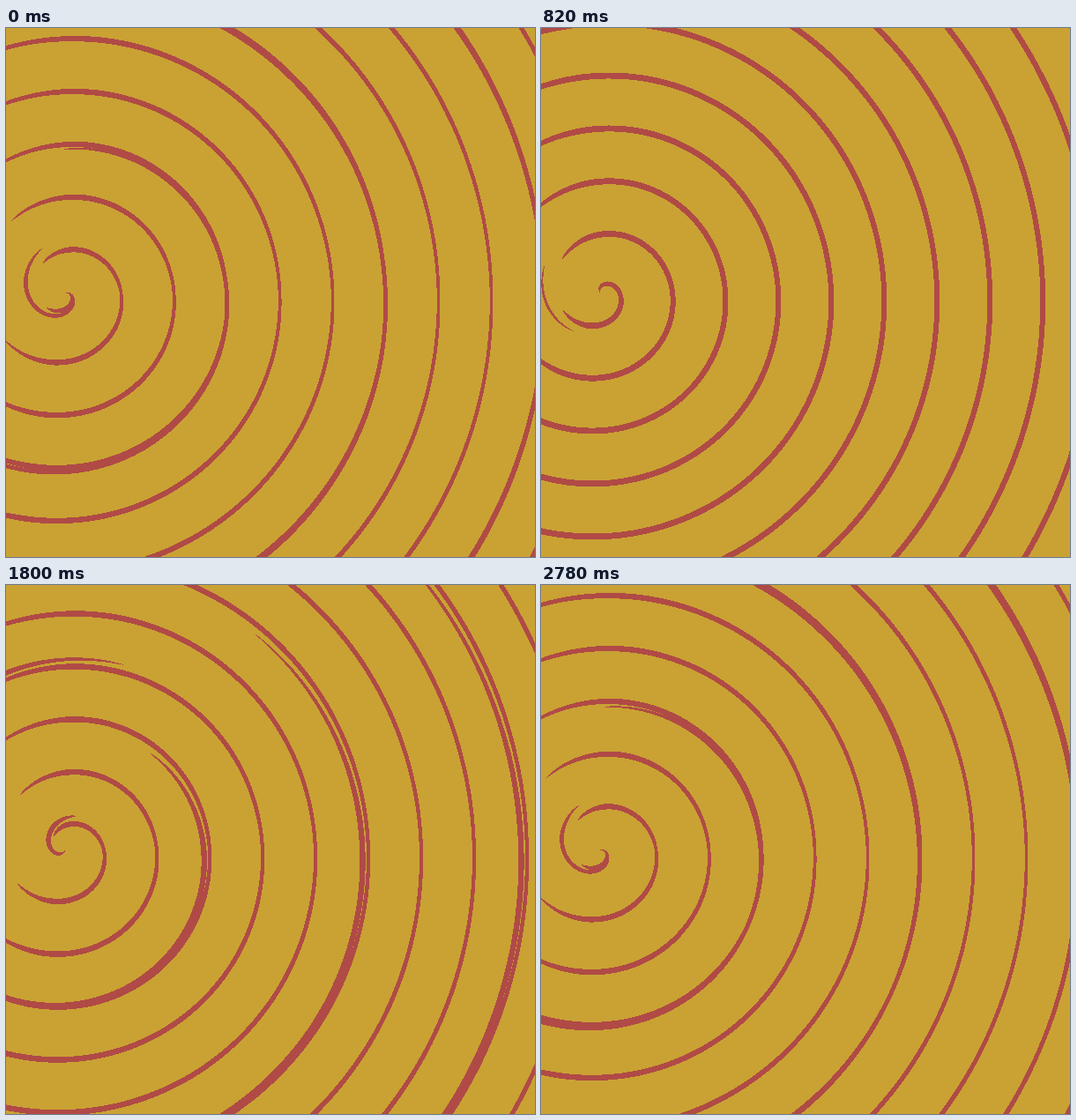
Animation, 600 px wide and 600 px high, one loop 2.8 s. Source, as an HTML page with a canvas:

```html
<!DOCTYPE html>
<html lang="en">
<head>
<meta charset="utf-8">
<title>Spiral</title>
<style>
html, body { margin: 0; width: 100%; height: 100%; overflow: hidden; background: #c9a233; }
canvas { display: block; width: 600px; height: 600px; }
</style>
</head>
<body>
<canvas id="stage" width="600" height="600"></canvas>
<script>
const SIZE = 600, LOOP = 2800, STEPS = 60, BINS = 3600;
const CX = 66.7, CY = 300;
const PITCH = 60, ARM_PITCH = 180;
const GOLD = 0xff33a2c9, RED = 0xff464ab0; // ABGR

const ctx = document.getElementById('stage').getContext('2d');
const image = ctx.createImageData(SIZE, SIZE);
const pixels = new Uint32Array(image.data.buffer);
const radius = new Float32Array(SIZE * SIZE);
const bin = new Uint16Array(SIZE * SIZE);

for (let y = 0, i = 0; y < SIZE; y++) {
  for (let x = 0; x < SIZE; x++, i++) {
    const dx = x - CX, dy = y - CY;
    const turn = Math.atan2(dy, dx) / (2 * Math.PI) + 1;
    radius[i] = Math.hypot(dx, dy);
    bin[i] = Math.floor((turn % 1) * BINS);
  }
}

const clamp = v => Math.min(1, Math.max(0, v));
const mix = (a, b, f) => a + (b - a) * f;
const smooth = f => f * f * (3 - 2 * f);
const rad = deg => deg * Math.PI / 180;

// Radius of the spiral, which grows by one pitch per turn and per loop.
function spiral(step, deg) {
  const drift = 1.1 * (1 - Math.cos(2 * Math.PI * step / 59));
  const lean = (1 + Math.cos(rad(deg))) / 2;
  return 3.3 + (step / 59 + deg / 360) * PITCH + drift * lean;
}

// Samples a curve by angle; shape(deg) gives its radius and width.
function curve(pitch, shape) {
  const mid = new Float32Array(BINS), half = new Float32Array(BINS);
  for (let b = 0; b < BINS; b++) {
    const [r, width] = shape(b * 360 / BINS);
    mid[b] = r;
    half[b] = width / 2;
  }
  return { mid, half, pitch };
}

// The main line swells mid-loop and thins out to a gap on the left.
function band(step) {
  const swell = Math.exp(-(((step - 25.5) / 10.5) ** 4));
  const right = 3.6 + 3.5 * swell, side = 6.4 + 0.8 * swell;
  const gap = 45 - 19 * swell;
  return curve(PITCH, deg => {
    const width = mix(right, side, Math.abs(Math.sin(rad(deg))));
    const taper = Math.sqrt(clamp((Math.abs(deg - 188) - gap) / 42));
    return [spiral(step, deg), width * taper];
  });
}

// A second, steeper arm crosses the main line and shrinks as it ages.
function arm(step) {
  const age = step - 26;
  const start = mix(-26 - 1.9 * age, 74 + 1.0 * age, smooth(clamp((age - 34) / 10)));
  const end = 312 - 2.05 * age;
  const full = 7 * Math.sqrt(clamp(1 - age / 66)) * clamp(1 + age / 9);
  return curve(ARM_PITCH, deg => {
    const a = deg > end ? deg - 360 : deg;
    const offset = 0.055 * (a - 180) + 0.25 * (age + 1);
    const taper = Math.sqrt(clamp(Math.min(a - start, end - a) / 45));
    return [spiral(step, a) + 2 * PITCH + offset, full * taper];
  });
}

function draw(step) {
  pixels.fill(GOLD);
  for (const { mid, half, pitch } of [band(step), arm(step), arm(step + STEPS)]) {
    for (let i = 0; i < pixels.length; i++) {
      const b = bin[i];
      if (half[b] === 0) continue;
      const u = radius[i] - mid[b];
      if (Math.abs(u - pitch * Math.round(u / pitch)) < half[b]) pixels[i] = RED;
    }
  }
  ctx.putImageData(image, 0, 0);
}

// Steps come in threes lasting 20, 20 and 100 ms.
function stepAt(time) {
  const t = (time + 20) % LOOP, rest = t % 140;
  const part = rest < 20 ? 0 : rest < 40 ? 1 : 2;
  return (Math.floor(t / 140) * 3 + part + STEPS - 1) % STEPS;
}

let shown = 0;
const origin = performance.now();
draw(shown);

function tick() {
  const step = stepAt(performance.now() - origin);
  if (step !== shown) draw(shown = step);
  requestAnimationFrame(tick);
}
requestAnimationFrame(tick);
</script>
</body>
</html>
```
